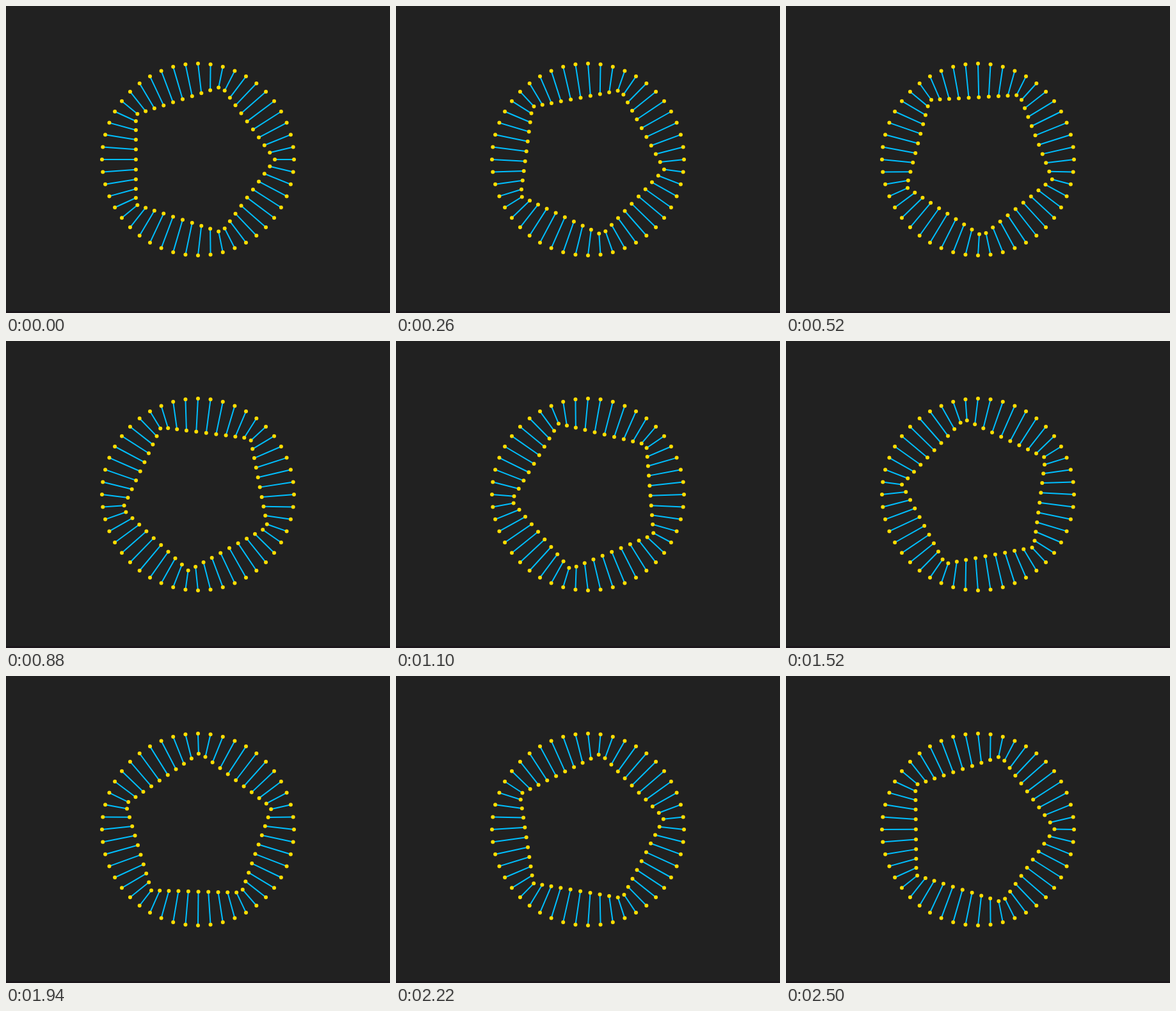
Recreate the animation shown at these times as an HTML page with a canvas. Size 600 by 480 pixels, loop 2520 ms.

```html
<!DOCTYPE html>
<html>
<head>
<meta charset="utf-8">
<style>
html, body { margin: 0; width: 100%; height: 100%; overflow: hidden; background: #212121; }
canvas { display: block; }
</style>
</head>
<body>
<canvas id="stage" width="600" height="480"></canvas>
<script>
const ctx = document.getElementById('stage').getContext('2d');
const LOOP = 2520, STEP = 20;
const COUNT = 48, OUTER = 150, INNER = 120;
const SIDE = Math.PI * 2 / 5;
const APOTHEM = INNER * Math.cos(SIDE / 2);

const polar = (r, a) => [r * Math.cos(a), r * Math.sin(a)];

// Project a point of the inner circle squarely onto its pentagon side.
function pentagonPoint(angle, turn) {
  const side = Math.floor((angle - turn) / SIDE);
  const normal = turn + (side + 0.5) * SIDE;
  const along = INNER * Math.sin(angle - normal);
  const [x, y] = polar(APOTHEM, normal);
  return [x - along * Math.sin(normal), y + along * Math.cos(normal)];
}

function dot([x, y]) {
  ctx.beginPath();
  ctx.arc(x, y, 3, 0, Math.PI * 2);
  ctx.fill();
}

function draw(now) {
  const time = Math.floor((now % LOOP) / STEP) * STEP;
  const turn = SIDE * time / LOOP;

  ctx.setTransform(1, 0, 0, 1, 0, 0);
  ctx.fillStyle = '#212121';
  ctx.fillRect(0, 0, 600, 480);
  ctx.fillStyle = '#1c171c';
  ctx.fillRect(0, 477, 600, 3);

  ctx.translate(300, 240);
  ctx.strokeStyle = '#00bfff';
  ctx.fillStyle = '#ffdd00';
  ctx.lineWidth = 2;
  for (let i = 0; i < COUNT; i++) {
    const angle = i / COUNT * Math.PI * 2;
    const outer = polar(OUTER, angle);
    const inner = pentagonPoint(angle, turn);
    ctx.beginPath();
    ctx.moveTo(...outer);
    ctx.lineTo(...inner);
    ctx.stroke();
    dot(outer);
    dot(inner);
  }
}

const start = performance.now();
function tick() {
  draw(performance.now() - start);
  requestAnimationFrame(tick);
}
tick();
</script>
</body>
</html>
```
